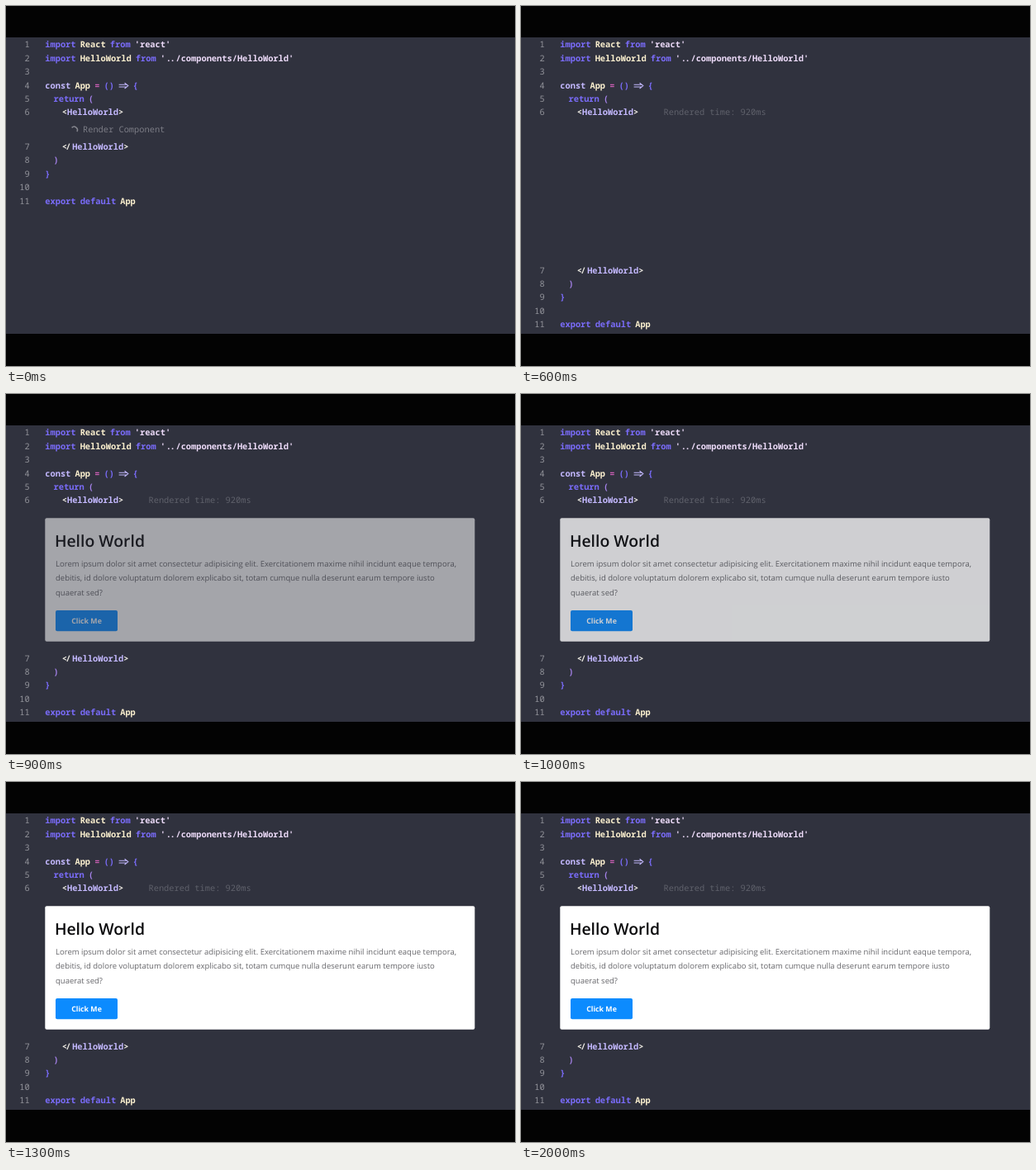
These frames come from a looping animation (616 by 436 pixels, 2.2 s). An HTML page:

```html
<!DOCTYPE html>
<html lang="en">
<head>
<meta charset="utf-8">
<title>Render component</title>
<style>
  html, body { margin: 0; width: 100%; height: 100%; overflow: hidden; background: #030303; }
  svg { display: block; width: 616px; height: 436px; }
  text { white-space: pre; text-rendering: geometricPrecision; }
  .code { font: 600 10.35px "Noto Sans Mono", "DejaVu Sans Mono", monospace; font-variant-ligatures: none; }
  .line { word-spacing: -1.1px; }
  .num { fill: #92939a; font-weight: 400; text-anchor: end; }
  .key { fill: #7a6cfa; }
  .name { fill: #fbf0cf; }
  .str { fill: #eedcfa; }
  .soft { fill: #c4b9ff; }
  .op { fill: #d060b8; }
  .paren { fill: #a582ea; }
  .angle { fill: #f1eee6; }
  .hint { font-weight: 400; }
  .card { font-family: "Open Sans", "Noto Sans", sans-serif; }
  .title { font-size: 19.4px; font-weight: 600; fill: #0a0a0c; }
  .body { font-size: 9.53px; fill: #67676b; }
  .label { font-size: 8.8px; font-weight: 700; fill: #fff; text-anchor: middle; }
</style>
</head>
<body>
<svg viewBox="0 0 616 436">
  <rect width="616" height="436" fill="#030303"/>
  <rect y="38" width="616" height="359" fill="#30323e"/>
  <g id="head" class="code"></g>
  <path d="M136.6 95.2H146M136.6 98H146M143.6 93.2L147.8 96.6L143.6 100" fill="none" stroke="#c4b9ff" stroke-width="1.1"/>
  <g id="loading" class="code hint">
    <path id="spinner" d="M79.6 147.4A4 4 0 0 1 85.9 152.2" fill="none" stroke="#85868e" stroke-width="1.5"/>
    <text x="93" y="153.3" fill="#7b7c85">Render Component</text>
  </g>
  <text id="timing" class="code hint" x="172.5" y="132.3" fill="#5f616b">Rendered time: 920ms</text>
  <g id="tail" class="code"></g>
  <g id="card" class="card">
    <rect x="47.3" y="150.2" width="520" height="149.5" rx="2" fill="#fff"/>
    <text class="title" x="58.9" y="184.6">Hello World</text>
    <g id="body" class="body"></g>
    <rect x="60" y="262" width="75" height="25.2" rx="2" fill="#0c8bfe"/>
    <text class="label" x="97.5" y="278.2">Click Me</text>
  </g>
</svg>
<script>
  const $ = id => document.getElementById(id);
  const PITCH = 16.4, LOOP = 2200, STEP = 100, OPEN = 149.7;

  function add(parent, tag, attrs, content = '') {
    const el = document.createElementNS('http://www.w3.org/2000/svg', tag);
    for (const key in attrs) el.setAttribute(key, attrs[key]);
    el.textContent = content;
    return parent.appendChild(el);
  }

  // Each token is [class, text, optional nudge in px].
  const headLines = [
    [['key', 'import '], ['name', 'React '], ['key', 'from '], ['str', "'react'"]],
    [['key', 'import '], ['name', 'HelloWorld '], ['key', 'from '], ['str', "'"],
     ['str', '.', 0.8], ['str', '.', -1.6], ['str', '/components/HelloWorld\'', 0.8]],
    [],
    [['soft', 'const '], ['name', 'App '], ['op', '= '], ['key', '() '], ['key', '{', 17.5]],
    [['key', '  return '], ['paren', '(']],
    [['angle', '    <'], ['soft', 'HelloWorld'], ['angle', '>']]
  ];
  const tailLines = [
    [['angle', '    <'], ['angle', '/', -1.6], ['soft', 'HelloWorld', 1.6], ['angle', '>']],
    [['paren', '  )']],
    [['key', '}']],
    [],
    [['key', 'export default '], ['name', 'App']]
  ];

  function writeLines(parent, lines, firstNumber, top) {
    lines.forEach((tokens, i) => {
      const y = top + i * PITCH;
      add(parent, 'text', { class: 'num', x: 28.6, y }, firstNumber + i);
      const line = add(parent, 'text', { class: 'line', x: 47.3, y });
      for (const [kind, text, dx = 0] of tokens) add(line, 'tspan', { class: kind, dx }, text);
    });
  }

  writeLines($('head'), headLines, 1, 50.3);
  writeLines($('tail'), tailLines, 7, 173.9);
  [
    'Lorem ipsum dolor sit amet consectetur adipisicing elit. Exercitationem maxime nihil incidunt eaque tempora,',
    'debitis, id dolore voluptatum dolorem explicabo sit, totam cumque nulla deserunt earum tempore iusto',
    'quaerat sed?'
  ].forEach((text, i) => add($('body'), 'text', { x: 60, y: 208.7 + i * 17.7 }, text));

  // One value per 100 ms step; the last one holds until the loop ends.
  const opening = [0, 0, 0, 0.2, 0.6, 0.9, 1];
  const fading = [0, 0, 0, 0, 0, 0, 0, 0, 0.18, 0.56, 0.77, 0.88, 0.95, 1];
  const at = (table, step) => table[Math.min(step, table.length - 1)];

  function draw(now) {
    const step = Math.floor((now % LOOP) / STEP);
    const open = at(opening, step);
    $('loading').setAttribute('opacity', open ? 0 : 1);
    $('timing').setAttribute('opacity', open ? 1 : 0);
    $('spinner').setAttribute('transform', `rotate(${step * 45} 82.6 150)`);
    $('tail').setAttribute('transform', `translate(0 ${open * OPEN})`);
    $('card').setAttribute('opacity', at(fading, step));
  }

  const start = performance.now();
  function tick() {
    draw(performance.now() - start);
    requestAnimationFrame(tick);
  }
  tick();
</script>
</body>
</html>
```
